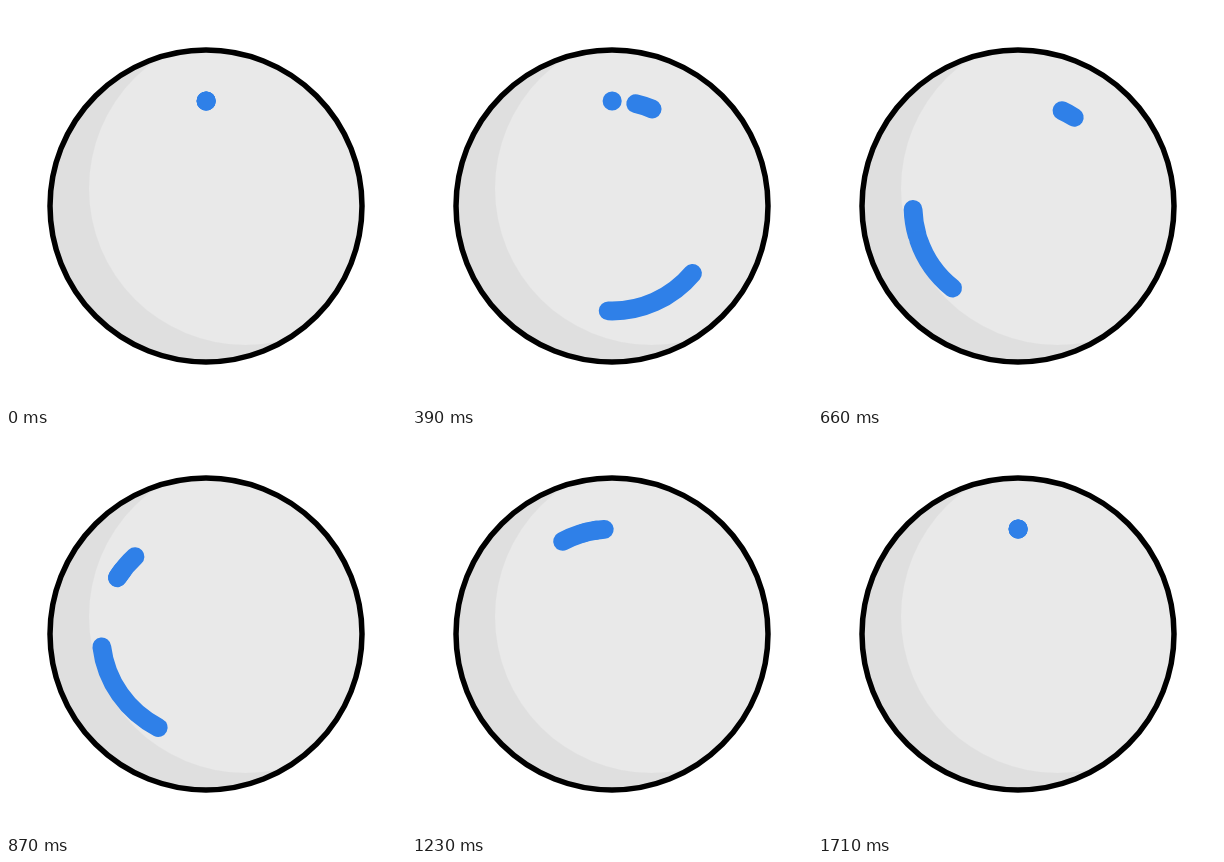
An HTML page with a canvas that plays this animation: 400 px wide and 400 px high, repeating every 1.77 s.

```html
<!DOCTYPE html>
<html lang="en">
<head>
<meta charset="utf-8">
<title>Spinner</title>
<style>
  html, body { margin: 0; width: 100%; height: 100%; overflow: hidden; background: #fff; }
  canvas { display: block; }
</style>
</head>
<body>
<canvas id="stage" width="400" height="400"></canvas>
<script>
const ctx = document.getElementById("stage").getContext("2d");
const STEP = 30, LOOP = 1770, TURN = Math.PI * 2;

// Each stroke has a head and a tail: start step, length in steps, ease-out handle, ease-in handle.
const strokes = [
  { head: [0, 58, .157, .1], tail: [0, 58, .3, .096] },
  { head: [8, 40, .37, 0], tail: [8, 44, .417, 0] },
  { head: [16, 32.8, .479, 0], tail: [16, 41, .414, .03] }
];

// Cubic Bezier ease (x1, 0, x2, 1), solved by bisection.
function ease(u, x1, x2) {
  let lo = 0, hi = 1;
  for (let i = 0; i < 30; i++) {
    const t = (lo + hi) / 2, r = 1 - t;
    const x = 3 * r * r * t * x1 + 3 * r * t * t * x2 + t * t * t;
    if (x < u) lo = t; else hi = t;
  }
  return lo * lo * (3 - 2 * lo);
}

function progress(step, [start, length, x1, x2]) {
  const u = (step - start) / length;
  return u <= 0 ? 0 : u >= 1 ? 1 : ease(u, x1, x2);
}

function circle(x, y, r) {
  ctx.beginPath();
  ctx.arc(x, y, r, 0, TURN);
}

function drawDisc() {
  ctx.save();
  circle(200, 200, 156);
  ctx.fillStyle = "#dfdfdf";
  ctx.fill();
  ctx.clip();
  circle(239.5, 182.5, 156.5);
  ctx.fillStyle = "#e9e9e9";
  ctx.fill();
  ctx.restore();
  circle(200, 200, 156);
  ctx.lineWidth = 5.5;
  ctx.strokeStyle = "#000";
  ctx.stroke();
}

function drawStroke(from, to) {
  const angle = from * TURN - Math.PI / 2;
  ctx.beginPath();
  ctx.arc(200, 200, 105, angle, angle + Math.max(to - from, .0005) * TURN);
  ctx.lineWidth = 18.8;
  ctx.lineCap = "round";
  ctx.strokeStyle = "#2f80e8";
  ctx.stroke();
}

function draw(now) {
  const step = Math.min(57, Math.floor((now % LOOP) / STEP));
  ctx.fillStyle = "#fff";
  ctx.fillRect(0, 0, 400, 400);
  drawDisc();
  for (const { head, tail } of strokes) drawStroke(progress(step, tail), progress(step, head));
}

const origin = performance.now();
function loop() {
  draw(performance.now() - origin);
  requestAnimationFrame(loop);
}
loop();
</script>
</body>
</html>
```
